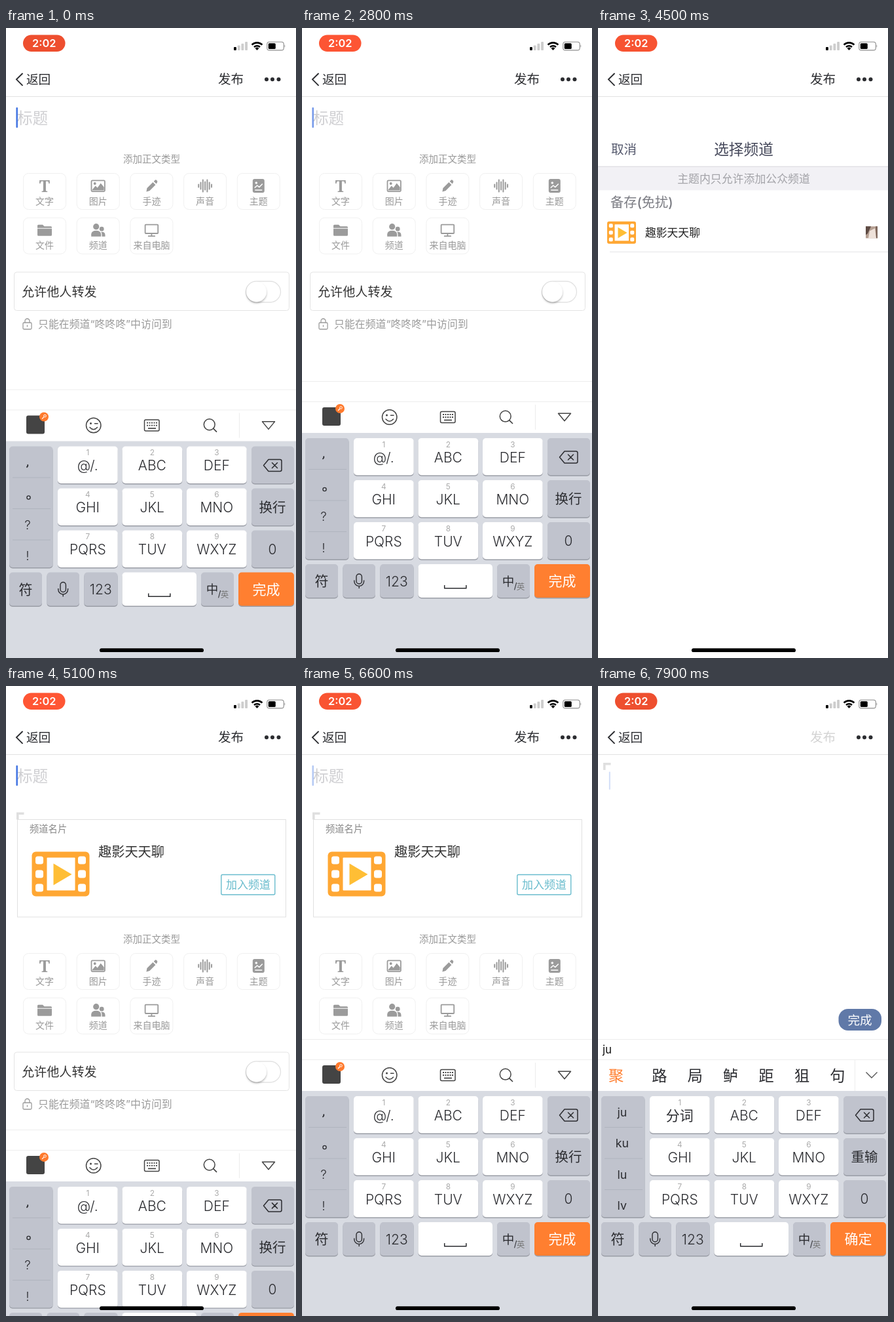
Write an HTML page that moves like this. It is 443x960 px and loops after 8000 ms.

```html
<!DOCTYPE html>
<html lang="zh-CN">
<head>
<meta charset="utf-8">
<style>
html, body { margin: 0; width: 100%; height: 100%; overflow: hidden; background: #fff; }
svg { display: block; width: 100%; height: 100%; font-family: Inter, "Noto Sans CJK SC", "Noto Sans CJK", sans-serif; }
</style>
</head>
<body>
<svg id="stage" viewBox="0 0 443 960" xmlns="http://www.w3.org/2000/svg"></svg>
<script>
const LOOP = 8000;
const SHEET_IN = 3686, SHEET_OUT = 4470, KEYS_IN = 4974, EDITOR = 6950;
const KEYS_HEIGHT = 422, CARD_SHIFT = 186;
const INK = '#2b2c30', GREY = '#9b9b9b', ORANGE = '#ff7f30';

// Text is placed by its vertical centre; anchor m, s or e.
const text = (x, cy, size, str, fill = INK, anchor = 'm', weight = 400) =>
  `<text x="${x}" y="${cy + size * 0.375}" font-size="${size}" fill="${fill}" font-weight="${weight}"` +
  ` text-anchor="${{ m: 'middle', s: 'start', e: 'end' }[anchor]}">${str}</text>`;
const rect = (x, y, w, h, r, fill, stroke = 'none', sw = 1) =>
  `<rect x="${x}" y="${y}" width="${w}" height="${h}" rx="${r}" fill="${fill}" stroke="${stroke}" stroke-width="${sw}"/>`;
const circle = (x, y, r, fill, stroke = 'none', sw = 1) =>
  `<circle cx="${x}" cy="${y}" r="${r}" fill="${fill}" stroke="${stroke}" stroke-width="${sw}"/>`;
const line = (d, stroke, sw = 1, extra = '') =>
  `<path d="${d}" fill="none" stroke="${stroke}" stroke-width="${sw}" ${extra}/>`;
const shape = (d, fill) => `<path d="${d}" fill="${fill}"/>`;
const at = (x, y, body, scale = 1) => `<g transform="translate(${x} ${y}) scale(${scale})">${body}</g>`;
const round = 'stroke-linecap="round" stroke-linejoin="round"';

function film(x, y, scale) {
  let s = rect(0, 0, 88, 68, 6, '#ffa733') + rect(23, 9, 43, 50, 1, '#fff');
  for (const hx of [5.5, 70.5])
    for (const hy of [7, 28, 49]) s += rect(hx, hy, 12, 12, 3.5, '#fff');
  return at(x, y, s + shape('M33 18 L61 34.5 L33 51 Z', '#ffbe35'), scale);
}

const icons = {
  文字: `<text y="9" font-size="25" font-weight="700" font-family="Noto Serif, Liberation Serif, serif" text-anchor="middle" fill="${GREY}">T</text>`,
  图片: rect(-10.2, -8.2, 20.4, 16.8, 1.5, 'none', GREY, 1.8) + circle(-5, -3.5, 2, GREY) +
    shape('M-9 6 L-4 0 L-1 3 L4 -4 L9 2 V7 H-9 Z', GREY),
  手迹: shape('M-8 9 L-7 3.5 L2 -5.5 L6 -1.5 L-3 7.5 Z M3.3 -6.8 L5.3 -8.8 Q6.5 -9.7 8 -8.2 Q9.6 -6.6 8.6 -5.2 L7.2 -3 Z', GREY),
  声音: [2, 5, 9, 6, 9, 5, 2].map((h, i) => {
    const x = (i - 3) * 3.3;
    return line(`M${x} ${-h} V${h}`, GREY, 2, round);
  }).join(''),
  主题: rect(-9, -10.5, 18, 21, 3, GREY) + circle(-3.5, -4.5, 1.8, '#fff') +
    line('M-6 3 L-2 -0.5 L1 2 L6 -3 M-5.5 6.5 H5.5', '#fff', 1.6),
  文件: shape('M-11 -7 Q-11 -8.5 -9.5 -8.5 H-3 L-0.5 -6 H9.5 Q11 -6 11 -4.5 V-3.5 H-11 Z M-11 -2.5 H11 V7 Q11 8.5 9.5 8.5 H-9.5 Q-11 8.5 -11 7 Z', GREY),
  频道: circle(-3, -5.5, 4.6, GREY) + shape('M-10.5 9.5 V6 Q-10 0.5 -3 0.5 Q4 0.5 4.5 6 V9.5 Z', GREY) +
    circle(5.5, -2, 3.4, GREY) + shape('M5.8 9.5 V6 Q5.5 4 4.5 2.6 Q10.5 2 10.8 7 V9.5 Z', GREY),
  来自电脑: rect(-9.8, -8.6, 19.6, 13.4, 1, 'none', GREY, 1.8) + line('M0 5 V9 M-5.5 9 H5.5', GREY, 1.8)
};

function options() {
  let s = text(222.5, 200, 14.5, '添加正文类型', '#999');
  Object.keys(icons).forEach((name, i) => {
    const x = 26.5 + (i % 5) * 81.7, y = 221.5 + Math.floor(i / 5) * 67.7;
    s += rect(x, y, 65, 55, 8, '#fff', '#f0f0f0') + at(x + 32.5, y + 19, icons[name]) +
      text(x + 32.5, y + 42, 14, name, '#999');
  });
  s += rect(12.5, 372, 420, 58.5, 4, '#fff', '#e4e4e4') + text(24, 402, 19.1, '允许他人转发', '#333', 's');
  s += rect(366.5, 386, 53, 32, 16, '#fff', '#e2e2e2', 1.3) +
    `<g filter="url(#soft)">${circle(382.5, 402, 15.3, '#fff')}</g>`;
  s += rect(26, 449, 13, 10, 1.5, 'none', GREY, 1.3) +
    line('M29 449 V446.5 A3.5 3.5 0 0 1 36 446.5 V449 M32.5 452.5 V455.5', GREY, 1.3);
  return s + text(49, 451, 15.9, '只能在频道“咚咚咚”中访问到', GREY, 's');
}

const corner = (x, y) => line(`M${x + 1.8} ${y + 11} V${y + 1.8} H${x + 11.5}`, '#dfdfdf', 3.6);

const card = () => corner(16, 192.5) + rect(17.5, 203.5, 410, 148.5, 0, '#fff', '#e1e1e1') +
  text(36, 218, 14.3, '频道名片', '#888', 's') + film(39.5, 252.5, 1) +
  text(141, 252, 20.2, '趣影天天聊', '#333', 's') +
  rect(328.8, 287.5, 82, 30.5, 2, '#fff', '#69bccd', 1.4) + text(370, 303, 17, '加入频道', '#69bccd');

const editor = () => rect(0, 105, 443, 855, 0, '#fff') + corner(8, 117) +
  rect(367.5, 492, 65.5, 33, 14.5, '#6079a8') + text(400, 509, 18.6, '完成', '#fff');

const nav = () => rect(0, 0, 443, 104, 0, '#fff') + line('M0 104.5 H443', '#e2e2e2') +
  line('M25.5 69 L16 78.3 L25.5 87.8', INK, 1.9) + text(31, 78.5, 18.6, '返回', INK, 's') +
  `<g id="publish">${text(343.5, 78, 19.6, '发布', 'currentColor')}</g>` +
  [398, 407, 416.5].map(x => circle(x, 78.3, 3, INK)).join('');

const sheet = () => rect(0, 0, 443, 1060, 0, '#fff') +
  text(20, 78.5, 19.6, '取消', '#565a6e', 's') + text(222.5, 78, 22.7, '选择频道', '#45485a', 'm', 500) +
  rect(0, 104.5, 443, 36.5, 0, '#f2f1f5') + line('M0 104.8 H443', '#d9d8dd') +
  text(222.5, 123, 16.9, '主题内只允许添加公众频道', '#a3a3a8') +
  text(19, 159, 20.2, '备存(免扰)', '#7b7c83', 's', 500) +
  film(14, 188.5, 0.5) + text(72, 205.5, 16.8, '趣影天天聊', '#222', 's') +
  rect(409, 196, 18, 18, 0, '#b59f92') + shape('M409 196 H417 L412 207 L409 209 Z', '#5d4a43') +
  shape('M415 203 L423 199 L425 214 H413 Z', '#eee2da') + shape('M424 196 H427 V214 H425 Z', '#7c655a') +
  line('M18 234.8 H443', '#e3e3e5');

const status = () => `<rect id="pill" x="26" y="10.5" width="64.5" height="25.5" rx="12.7"/>` +
  text(58.3, 23.3, 16.4, '2:02', '#fff', 'm', 600) +
  [5, 7.5, 10.2, 13].map((h, i) => rect(348 + i * 5.7, 34 - h, 3.9, h, 1, i ? '#cdcdcd' : '#000')).join('') +
  line('M375.6 25.6 A11.3 11.3 0 0 1 391.4 25.6', '#000', 2.6) +
  line('M379 29 A6.5 6.5 0 0 1 388 29', '#000', 2.5) + shape('M383.5 34 L380.6 31 A4.2 4.2 0 0 1 386.4 31 Z', '#000') +
  rect(398.8, 21.3, 25.5, 12.6, 3.5, 'none', '#8d8d8d', 1.1) + rect(400.8, 23.2, 11, 8.8, 1.6, '#000') +
  shape('M425.5 25.5 Q427.4 27.5 425.5 29.7 Z', '#8d8d8d');

const key = (x, y, w, h, fill) => rect(x, y + 1.4, w, h, 5, '#9a9da6') + rect(x, y, w, h, 5, fill);

const toolbar = () => rect(31, 578, 28, 28, 3, '#444') + circle(58, 580, 7, '#ff7a2d') +
  circle(59.5, 578.5, 1.8, 'none', '#fff') + line('M58 580 L55 583', '#fff', 1.2) +
  circle(133.7, 593, 11.2, 'none', '#444', 1.5) + circle(129.5, 590, 1.5, '#444') +
  line('M135.5 590.3 H140 M128 596 Q133.7 602.5 139.5 596', '#444', 1.5, round) +
  rect(211.5, 584.5, 22.5, 17, 2, 'none', '#444', 1.5) +
  line('M215 589 H231 M215 593 H231', '#444', 1.8, 'stroke-dasharray="2 1.5"') + line('M217 597.5 H229', '#444', 1.7) +
  circle(310.7, 591.7, 8.4, 'none', '#444', 1.5) + line('M316.8 597.8 L321.5 602.5', '#444', 1.7, round) +
  line('M356.5 574 V612', '#ececec') + line('M391.5 587.3 H410.5 L401 598.8 Z', '#444', 1.5, round);

const candidates = (composed, words) => text(7, 554, 16.8, composed, '#111', 's') +
  [...words].map((c, i) => text(i ? 39.5 + i * 54.4 : 27.5, 593, 23.2, c, i ? INK : ORANGE)).join('') +
  rect(390, 570, 53, 47, 0, '#fff') + line('M392.5 570 V617', '#eee') +
  line('M409.5 588.5 L418 597 L426.5 588.5', '#555', 1.4);

const inputs = {
  idle: { side: '，。?!', first: '@/.', wipe: '换行', done: '完成', bar: toolbar },
  j: { side: ['j', 'k', 'l', '5'], first: '分词', wipe: '重输', done: '确定', bar: () => candidates('j', '就看了来可快里') },
  ju: { side: ['ju', 'ku', 'lu', 'lv'], first: '分词', wipe: '重输', done: '确定', bar: () => candidates('ju', '聚路局鲈距狙句') }
};

function keyboard(mode) {
  const { side, first, wipe, done, bar } = inputs[mode], soft = '#c0c3cd';
  let s = rect(0, 538, 443, 80, 0, '#fff') + line('M0 538.5 H443 M0 569.5 H443', '#ededed') + bar();
  s += rect(0, 617, 443, 344, 0, '#d8dbe2') + key(5, 625, 66.5, 184.5, soft);
  for (let i = 1; i < 4; i++) s += line(`M10 ${625 + i * 47.5} H68`, '#b0b4be');
  if (mode === 'idle') {
    s += line('M33 652.5 q1.2 2.4 -1.6 4.4', INK, 1.7) + circle(34.5, 703, 2.6, 'none', INK, 1.3) +
      text(33, 744, 19, side[2], INK, 'm', 300) + text(33, 791.5, 19, side[3], INK, 'm', 300);
  } else {
    side.forEach((c, i) => s += text(36.8, 649 + i * 47.6, 17.8, c));
  }
  [first, 'ABC', 'DEF', 'GHI', 'JKL', 'MNO', 'PQRS', 'TUV', 'WXYZ'].forEach((label, i) => {
    const x = 79 + (i % 3) * 98.5, y = 625 + Math.floor(i / 3) * 64;
    s += key(x, y, 91.7, 56.5, '#fff') + text(x + 45.8, y + 9.5, 11.8, i + 1, '#aaa') +
      text(x + 45.8, y + 29, 21, label, INK, 'm', 300);
  });
  [0, 1, 2].forEach(i => s += key(375, 625 + i * 64, 65, 56.5, soft));
  s += line('M393.5 654 L401 645 H418.5 Q421 645 421 647.5 V660.5 Q421 663 418.5 663 H401 Z M406.5 650 L414.5 658 M414.5 650 L406.5 658', INK, 1.5, round) +
    text(407, 717.5, 20.5, wipe, INK, 'm', 300) + text(407, 781.5, 21, '0', INK, 'm', 300);
  for (const [x, w, fill] of [[5, 50, soft], [62.5, 49.5, soft], [119.3, 51.2, soft], [177.5, 113.5, '#fff'], [298, 50, soft], [355, 85, ORANGE]])
    s += key(x, 817, w, 51, fill);
  s += text(30, 842.5, 21, '符', INK, 'm', 300) + text(144.7, 842.7, 21, '123', INK, 'm', 300) +
    rect(83, 832, 8.4, 15, 4.2, 'none', INK, 1.4) +
    line('M79.8 841.5 V843 A7.4 7.4 0 0 0 94.6 843 V841.5 M87.2 850.5 V854', INK, 1.4) +
    line('M217.7 849 V853.7 H250.8 V849', INK, 1.5) + text(315, 843, 18.5, '中') +
    text(326, 850, 13, '/') + text(334, 851, 12.5, '英', '#777');
  return s + text(397.5, 842.5, 21, done, '#fff', 'm', 300);
}

const stage = document.getElementById('stage');
stage.innerHTML = `<defs><filter id="soft" x="-30%" y="-30%" width="160%" height="170%">
  <feDropShadow dx="0" dy="2" stdDeviation="1.6" flood-opacity=".3"/></filter></defs>` +
  rect(0, 0, 443, 960, 0, '#fff') +
  `<g id="page">${text(17, 137, 23.6, '标题', '#cfcfd2', 's')}<g id="card">${card()}</g><g id="options">${options()}</g></g>` +
  `<g id="editor">${editor()}</g><rect id="caret" rx="1" fill="#4677e3"/>` + nav() +
  `<g id="keys"></g><g id="sheet">${sheet()}</g>` + status() + rect(143, 945.3, 159, 5.8, 2.9, '#000');

const el = id => document.getElementById(id);
const set = (id, attrs) => { for (const k in attrs) el(id).setAttribute(k, attrs[k]); };
const show = (id, on) => set(id, { display: on ? 'inline' : 'none' });
const slide = (id, y) => set(id, { transform: `translate(0 ${y})` });

// Critically damped spring: remaining distance from 1 to 0.
function remaining(ms) {
  const w = 0.01825 * Math.max(0, ms);
  return (1 + w) * Math.exp(-w);
}

function blink(ms) {
  const p = ((ms % 1000) + 1000) % 1000;
  const ramp = (from, to) => Math.min(1, Math.max(0, (p - from) / (to - from)));
  return 1 - ramp(530, 690) + ramp(720, 830);
}

let shownMode;
function render(t) {
  const editing = t >= EDITOR, hasCard = t >= SHEET_OUT;
  const mode = t < 7350 ? 'idle' : t < 7650 ? 'j' : 'ju';
  if (mode !== shownMode) el('keys').innerHTML = keyboard(shownMode = mode);

  const keysLeft = t < SHEET_IN ? remaining(t + 293)
    : t < KEYS_IN ? 1 - remaining(t - SHEET_IN) : remaining(t - KEYS_IN);
  slide('keys', keysLeft * KEYS_HEIGHT);
  show('keys', t < SHEET_OUT || t >= KEYS_IN);

  const sheetLeft = t < SHEET_OUT ? remaining(t - SHEET_IN) : 1 - remaining(t - SHEET_OUT);
  slide('sheet', sheetLeft * 960);
  show('sheet', t > SHEET_IN && t < KEYS_IN);

  show('page', !editing);
  show('editor', editing);
  show('card', hasCard);
  slide('options', hasCard ? CARD_SHIFT : 0);
  el('publish').style.color = editing ? '#d3d3d3' : INK;

  const start = editing ? 7250 : t < SHEET_IN ? 0 : KEYS_IN;
  const focused = t < SHEET_IN || t >= KEYS_IN;
  set('caret', editing ? { x: 16.8, y: 130.5, width: 2, height: 27.5 } : { x: 15.4, y: 121, width: 2.6, height: 31 });
  set('caret', { opacity: focused ? blink(t - start) : 0 });

  const glow = 0.5 - 0.5 * Math.cos(t * Math.PI / 1000);
  set('pill', { fill: `rgb(${238 + 17 * glow},${79 + 7 * glow},${47 + 5 * glow})` });
}

const begin = performance.now();
function tick() {
  render((performance.now() - begin) % LOOP);
  requestAnimationFrame(tick);
}
tick();
</script>
</body>
</html>
```
